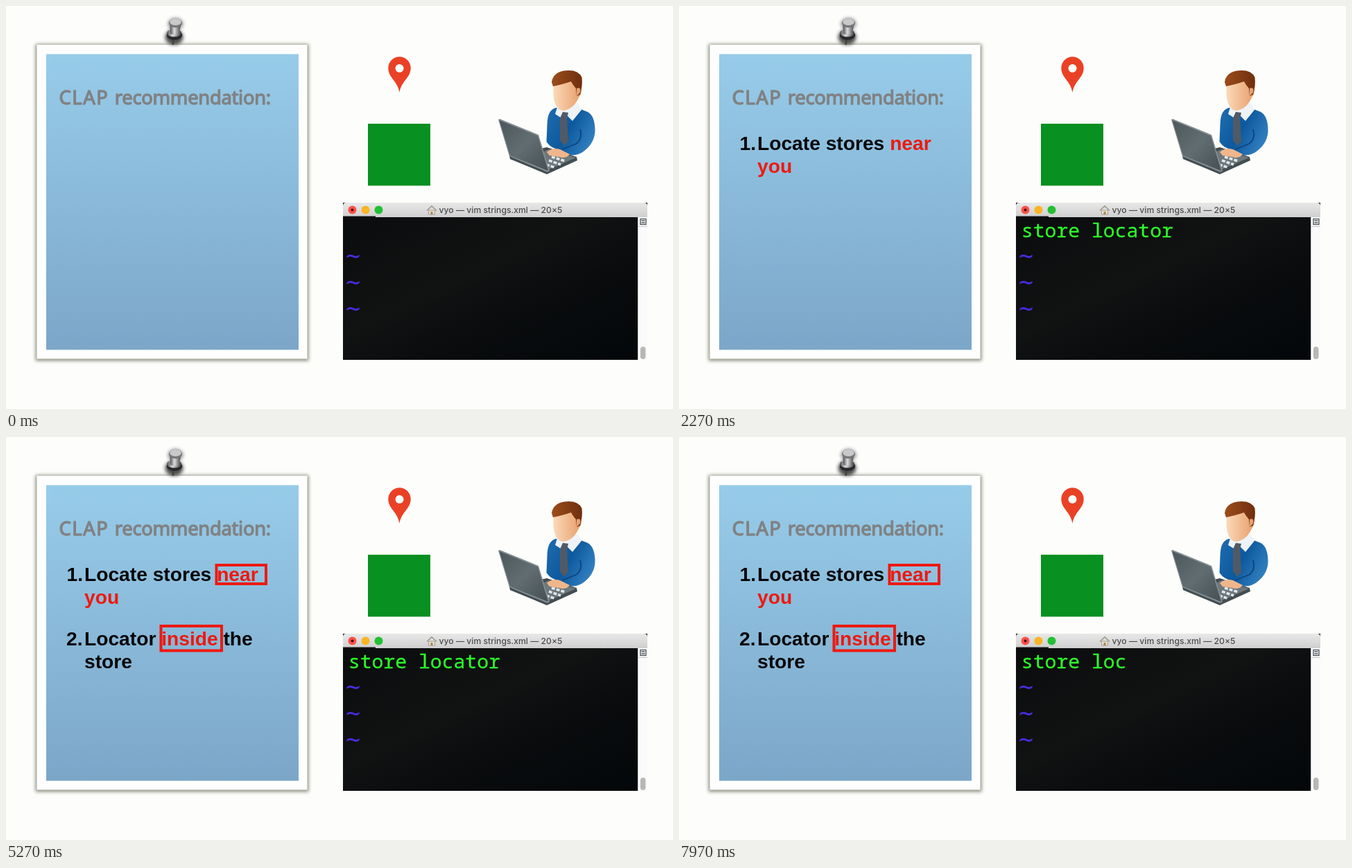
An HTML page that plays this animation: 962 px wide and 582 px high, repeating every 8000 ms.

```html
<!DOCTYPE html>
<html lang="en">
<head>
<meta charset="utf-8">
<title>Recommendation note</title>
<style>
  html, body { margin: 0; width: 100%; height: 100%; overflow: hidden; background: #fdfefb; }
  svg { display: block; width: 100%; height: 100%; }
  text { white-space: pre; }
  .heading { font: 27.4px "Noto Sans", sans-serif; fill: #808284; stroke: #808284; stroke-width: 1.3; stroke-linejoin: round; }
  .item { font: bold 28.2px "Liberation Sans", Arial, sans-serif; fill: #050608; }
  .red { fill: #ee190f; }
  .frame { fill: none; stroke: #ee190f; stroke-width: 4; }
  .title { font: 500 12.2px Inter, sans-serif; fill: #4b4b4b; text-anchor: middle; }
  .typed { font: 28.1px "Noto Sans Mono", monospace; fill: #2dfb2b; stroke: #2dfb2b; stroke-width: .3; }
  .tilde { font: 35px "DejaVu Sans Mono", monospace; fill: #4a2bdc; }
</style>
</head>
<body>
<svg viewBox="0 0 962 582" preserveAspectRatio="none">
  <defs>
    <linearGradient id="paper" x2="0" y2="1">
      <stop stop-color="#97cce9"/><stop offset="1" stop-color="#7ca6c8"/>
    </linearGradient>
    <linearGradient id="bar" x2="0" y2="1">
      <stop stop-color="#e8e8e8"/><stop offset="1" stop-color="#cfcfcf"/>
    </linearGradient>
    <linearGradient id="screen" x2="1" y2="1">
      <stop stop-color="#0b0c0d"/><stop offset=".42" stop-color="#111212"/>
      <stop offset=".62" stop-color="#0a0c0e"/><stop offset="1" stop-color="#040709"/>
    </linearGradient>
    <linearGradient id="metal">
      <stop stop-color="#4c4c4e"/><stop offset=".4" stop-color="#dededf"/><stop offset="1" stop-color="#3c3c3e"/>
    </linearGradient>
    <linearGradient id="skin">
      <stop stop-color="#fbd9ba"/><stop offset="1" stop-color="#e79e68"/>
    </linearGradient>
    <linearGradient id="hair">
      <stop stop-color="#9c4d1c"/><stop offset="1" stop-color="#6f2f0d"/>
    </linearGradient>
    <linearGradient id="shirt" x2="1" y2=".5">
      <stop stop-color="#1f6cb0"/><stop offset=".55" stop-color="#0d599d"/><stop offset="1" stop-color="#2f7cbd"/>
    </linearGradient>
    <linearGradient id="lid" x2="1" y2="1">
      <stop stop-color="#4c575c"/><stop offset=".5" stop-color="#616d71"/><stop offset="1" stop-color="#454f54"/>
    </linearGradient>
    <filter id="soft" x="-40%" y="-40%" width="180%" height="180%"><feGaussianBlur stdDeviation="2.6"/></filter>
  </defs>
  <rect width="962" height="582" fill="#fdfefb"/>

  <!-- note -->
  <rect x="42.500" y="55" width="394" height="457.500" fill="#6c6f5c" opacity=".75" filter="url(#soft)"/>
  <rect x="44.500" y="56" width="390" height="453.500" fill="#fefefe"/>
  <rect x="58" y="69.500" width="364" height="427" fill="url(#paper)"/>
  <text class="heading" x="76.500" y="141.500" letter-spacing="1.5">CLAP</text>
  <text class="heading" x="156.800" y="141.500" letter-spacing="-.3">recommendation:</text>

  <!-- push pin -->
  <ellipse cx="242.500" cy="45" rx="13" ry="11" fill="#222" opacity=".8" filter="url(#soft)"/>
  <ellipse cx="244.500" cy="26" rx="11" ry="9" fill="#333" opacity=".5" filter="url(#soft)"/>
  <path d="M242 46L240.500 56" stroke="#45423c" stroke-width="2.400"/>
  <ellipse cx="243" cy="42" rx="11.300" ry="7" fill="#29292b"/>
  <ellipse cx="242.500" cy="39" rx="10.500" ry="5.500" fill="url(#metal)"/>
  <path d="M236.500 26L237 40Q242.500 43 249.500 40L252.500 26Z" fill="url(#metal)"/>
  <ellipse cx="244.500" cy="24.500" rx="9.500" ry="6.800" fill="#77777a"/>
  <ellipse cx="244.500" cy="23" rx="8.300" ry="5" fill="#c9c9cb"/>

  <g id="first" class="item">
    <text x="87.500" y="208">1.</text>
    <text x="113" y="208">Locate stores <tspan class="red">near</tspan></text>
    <text x="113" y="241" class="red">you</text>
  </g>
  <g id="second" class="item">
    <text x="87" y="301">2.</text>
    <text x="113" y="301">Locator <tspan class="red">inside</tspan> the</text>
    <text x="113" y="334">store</text>
  </g>
  <g id="frames" class="frame">
    <rect x="303.500" y="185" width="71.500" height="27"/>
    <rect x="223.500" y="273" width="87.500" height="35.500"/>
  </g>

  <!-- map marker and app tile -->
  <path d="M567.500 125C565 108 551.300 104 551.300 89.500A16.200 16.200 0 0 1 583.700 89.500C583.700 104 570 108 567.500 125Z" fill="#ea4126"/>
  <circle cx="567.500" cy="90" r="6" fill="#fdfefb"/>
  <rect x="522" y="170" width="90" height="89.500" fill="#089020"/>

  <!-- man with laptop -->
  <path d="M793 147C784 150 781 157 780.500 172L779.500 196Q786 206 800 208L812 215Q824 217 833 210Q848 199 849.500 182Q850 159 839 153L826 148Z" fill="url(#shirt)"/>
  <path d="M828 178Q832 192 822 199L802 207" fill="none" stroke="#0a4580" stroke-width="1.800"/>
  <path d="M796 143L792 156L803 163L809 158L817 166L830 150L825 140Z" fill="#eef3f8"/>
  <path d="M803 153L799 162L799 194L805 202L811 195L809 162L811 154Z" fill="#505a66"/>
  <path d="M790 111Q788 130 792 141Q797 152 805 151Q816 149 823 138L829 127Q832 119 826 116L822 104L800 101Z" fill="url(#skin)"/>
  <path d="M787 110Q789 96 805 93.500Q825 91 830.500 103Q832 114 828 128L823 130L822 119Q817 113 815 109Q800 114 789 116Z" fill="url(#hair)"/>
  <path d="M823 119Q830 116 828 125L823 130Z" fill="#e5a274"/>
  <path d="M726 216L780 204L823 218L824 223L780 243L727 221Z" fill="#434d52"/>
  <path d="M762 216L783 207L822 219L781 237Z" fill="#6d787c"/>
  <g stroke="#e3e8ea" stroke-width="3.500" stroke-dasharray="5 2" fill="none">
    <path d="M787 218L807 224M783 223L800 229M779 229L791 233"/>
  </g>
  <path d="M780 211Q788 204 799 207L813 214Q808 221 798 218L784 216Z" fill="#efb68c"/>
  <path d="M710 164L712 163L768 186L784 238L781 240L726 217Z" fill="#848f93"/>
  <path d="M711.500 165L767 187.500L782 238L727 216Z" fill="url(#lid)"/>

  <!-- terminal -->
  <path d="M486 290V284H492ZM919 284H925V290Z" fill="#222"/>
  <path d="M486 305V289Q486 284 491 284H920Q925 284 925 289V305Z" fill="url(#bar)"/>
  <rect x="486" y="303.500" width="47" height="2" fill="#161616"/>
  <circle cx="499.500" cy="294.500" r="6" fill="#fb5149"/>
  <circle cx="499.500" cy="294.500" r="2" fill="#4c0704"/>
  <circle cx="518.500" cy="294.500" r="6" fill="#f8b524"/>
  <circle cx="537.500" cy="294.500" r="6" fill="#22c034"/>
  <path d="M609.500 295V301H618.500V295Z" fill="#e9e3d4" stroke="#a69c8a"/>
  <path d="M607 295.500L614 289L621 295.500" fill="none" stroke="#a29a8d" stroke-width="1.700"/>
  <rect x="612.500" y="297" width="3" height="4" fill="#a98254"/>
  <text class="title" x="713.500" y="299">vyo — vim strings.xml — 20×5</text>
  <rect x="486" y="305" width="425.500" height="206" fill="url(#screen)"/>
  <rect x="911.500" y="305" width="13.500" height="206" fill="#fafafa"/>
  <path d="M911.500 318.500H925" stroke="#c9c9c9"/>
  <rect x="915" y="307.500" width="8" height="8" fill="#fff" stroke="#4c5058" stroke-width="1.300"/>
  <path d="M916.500 310H921.500M916.500 313H921.500" stroke="#4c5058" stroke-width="1.300"/>
  <rect x="915" y="492" width="7.500" height="18" rx="3.700" fill="#b7b7b5"/>
  <text id="typed" class="typed" x="493.800" y="334"></text>
  <g class="tilde">
    <text x="490" y="373">~</text>
    <text x="490" y="411">~</text>
    <text x="490" y="449">~</text>
  </g>
</svg>
<script>
  const LOOP = 8000;
  const QUERY = "store locator";
  const TYPE_STEP = 95;
  const ERASE_START = 7550;
  const ERASE_STEP = 100;
  const APPEAR = { first: 1500, second: 2800, frames: 3900 };

  const byId = id => document.getElementById(id);
  const typed = byId("typed");
  const start = performance.now();

  function draw() {
    const t = (performance.now() - start) % LOOP;
    const written = Math.min(QUERY.length, Math.floor(t / TYPE_STEP));
    const erased = Math.max(0, Math.floor((t - ERASE_START) / ERASE_STEP));
    typed.textContent = QUERY.slice(0, written - erased);
    for (const [id, time] of Object.entries(APPEAR)) {
      byId(id).style.visibility = t >= time ? "visible" : "hidden";
    }
    requestAnimationFrame(draw);
  }
  draw();
</script>
</body>
</html>
```
